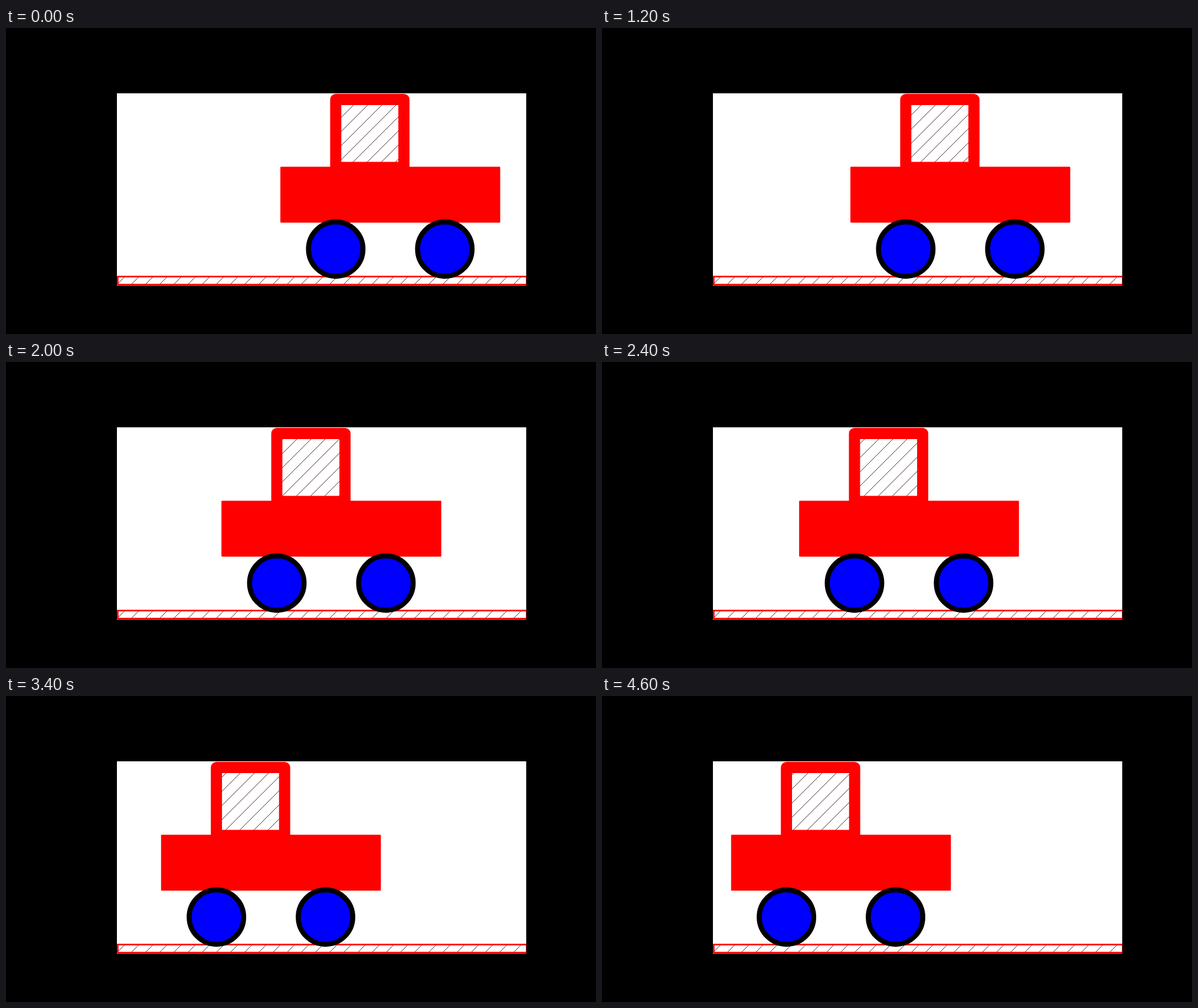
Recreate the animation shown at these times as an HTML page with a canvas. Size 1000x520 px, loop 5000 ms.

```html
<!DOCTYPE html>
<html lang="en">
<head>
<meta charset="utf-8">
<title>Toy car</title>
<style>
  html, body { margin: 0; height: 100%; overflow: hidden; background: #000; }
  canvas { display: block; }
</style>
</head>
<body>
<canvas id="stage" width="1000" height="520"></canvas>
<script>
const ctx = document.getElementById('stage').getContext('2d');
const LOOP = 5000, STEP = 200, LAST_POSE = 23;
const UNIT = 92.45;              // wheel diameter; the other parts are multiples of it
const WHEEL_Y = 375.7;
const BODY_BOTTOM = WHEEL_Y - UNIT / 2;
const BODY_TOP = BODY_BOTTOM - UNIT;
const CAB = 1.25 * UNIT;
const HATCH_GAP = 24;

function strokeBox(x, y, w, h, lineWidth) {
  ctx.strokeStyle = '#f00';
  ctx.lineWidth = lineWidth;
  ctx.strokeRect(x, y, w, h);
}

// Diagonals lie on x + y = n * HATCH_GAP, fixed to the stage.
function hatch(x, y, w, h) {
  ctx.save();
  ctx.beginPath();
  ctx.rect(x, y, w, h);
  ctx.clip();
  ctx.beginPath();
  const first = Math.ceil((x + y) / HATCH_GAP) * HATCH_GAP;
  for (let sum = first; sum <= x + y + w + h; sum += HATCH_GAP) {
    ctx.moveTo(sum - y, y);
    ctx.lineTo(sum - y - h, y + h);
  }
  ctx.strokeStyle = '#503030';
  ctx.lineWidth = 1;
  ctx.stroke();
  ctx.restore();
}

function hatchedBox(x, y, w, h, lineWidth) {
  hatch(x, y, w, h);
  strokeBox(x, y, w, h, lineWidth);
}

function wheel(x) {
  ctx.beginPath();
  ctx.arc(x, WHEEL_Y, UNIT / 2, 0, 2 * Math.PI);
  ctx.fillStyle = '#00f';
  ctx.fill();
  ctx.strokeStyle = '#000';
  ctx.lineWidth = 8.4;
  ctx.stroke();
}

function car(x) {
  hatchedBox(x, BODY_TOP - CAB, CAB, CAB, 18.9);
  ctx.fillStyle = '#f00';
  ctx.fillRect(x - UNIT, BODY_TOP, 4 * UNIT, UNIT);
  strokeBox(x - UNIT, BODY_TOP, 4 * UNIT, UNIT, 2.8);
  wheel(x);
  wheel(x + 2 * UNIT);
}

function draw(now) {
  const pose = Math.min(Math.floor(now % LOOP / STEP), LAST_POSE);
  const x = 435.75 + 124.1 * Math.cos(Math.PI * (pose + 1) / 25);
  ctx.fillStyle = '#000';
  ctx.fillRect(0, 0, 1000, 520);
  ctx.save();
  ctx.beginPath();
  ctx.rect(188, 111, 694, 327);
  ctx.clip();
  ctx.fillStyle = '#fff';
  ctx.fillRect(188, 111, 693.7, 327);
  ctx.lineJoin = 'round';
  hatchedBox(189.4, 422.4, 7.5 * UNIT, 0.15 * UNIT, 2.8);
  car(x);
  ctx.restore();
}

const start = performance.now();
function tick() {
  draw(performance.now() - start);
  requestAnimationFrame(tick);
}
tick();
</script>
</body>
</html>
```
